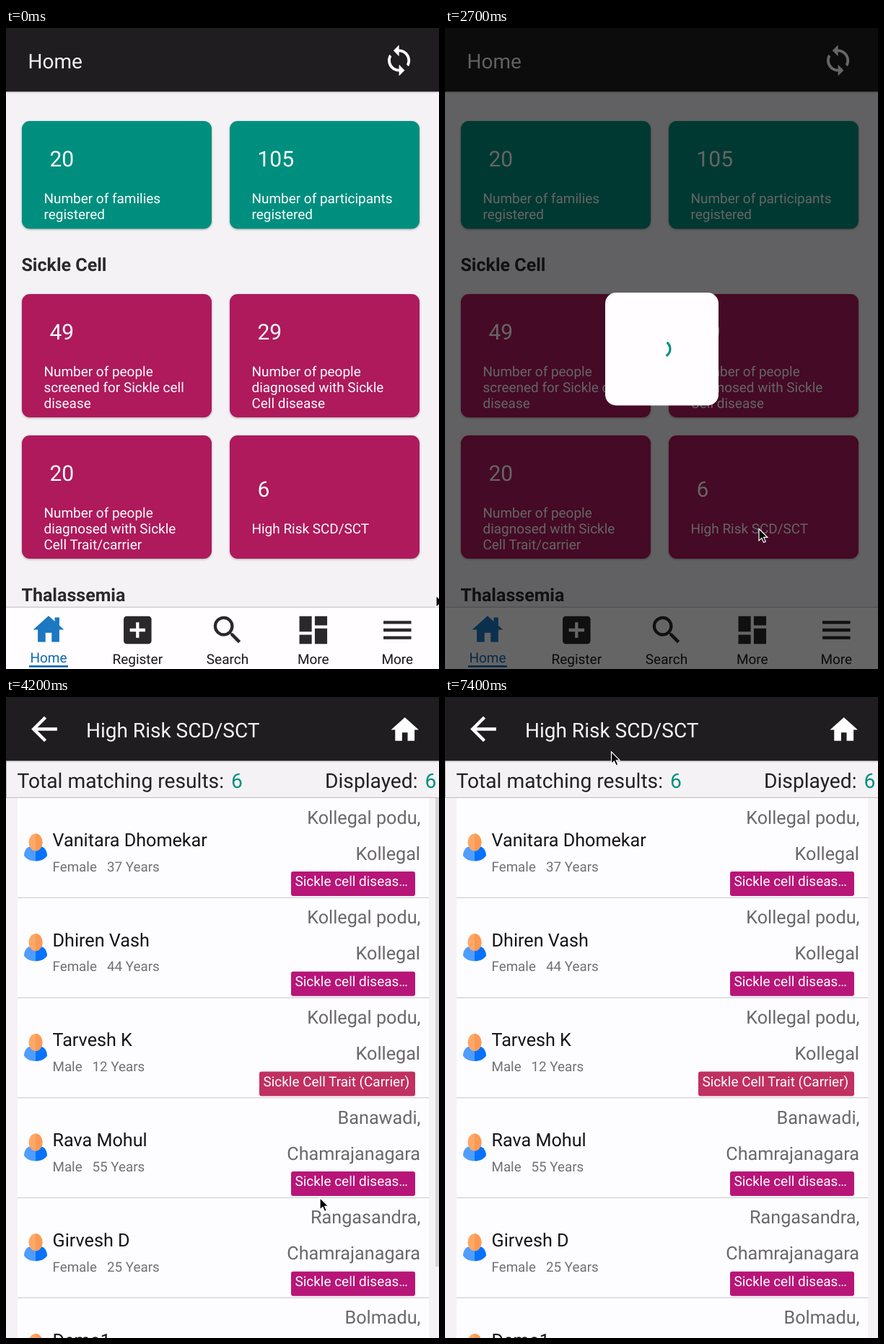
Recreate the animation shown at these times as an HTML page. Size 600 by 889 pixels, loop 7.5 s.

```html
<!DOCTYPE html>
<html lang="en">
<head>
<meta charset="utf-8">
<title>High risk list</title>
<style>
html, body { margin: 0; width: 100%; height: 100%; overflow: hidden; background: #f4f2f5; }
svg { display: block; width: 100%; height: 100%; }
text { font-family: Roboto, sans-serif; text-rendering: geometricPrecision; }
.card { filter: drop-shadow(0 1.5px 1.5px rgba(0, 0, 0, .3)); }
</style>
</head>
<body>
<svg viewBox="0 0 600 889">
  <g id="home"></g>
  <rect id="shade" width="600" height="889" opacity="0"/>
  <g id="results"></g>
  <g id="modal">
    <rect width="600" height="889" opacity=".6"/>
    <rect x="222" y="367" width="157" height="156.500" rx="15" fill="#fffdff"/>
    <circle id="spin" cx="300.500" cy="445" r="11.500" fill="none" stroke="#008f7e" stroke-width="3" pathLength="1"/>
  </g>
  <path id="cursor" d="M0 0V16.500L3.900 12.900L6.600 19L9.300 17.800L6.700 11.900H11.800Z" stroke="#fff" stroke-width="1.200"/>
</svg>
<script>
const LOOP = 7500, STEP = 100;
const DARK = '#1f1d20', INK = '#2a282b', PAGE = '#f4f2f5', TEAL = '#008f7e', PINK = '#ae1a5c', WHITE = '#fdfcfe';
const el = id => document.getElementById(id);
const rect = (x, y, w, h, fill, extra = '') =>
  `<rect x="${x}" y="${y}" width="${w}" height="${h}" fill="${fill}" ${extra}/>`;
const text = (x, y, size, fill, str, extra = '') =>
  `<text x="${x}" y="${y}" font-size="${size}" fill="${fill}" ${extra}>${str}</text>`;
const icon = (name, cx, cy, s, fill) =>
  `<path transform="translate(${cx} ${cy}) scale(${s}) translate(-12 -12)" fill="${fill}" d="${ICONS[name]}"/>`;

const ICONS = {
  sync: 'M12 4V1L8 5l4 4V6c3.310 0 6 2.690 6 6 0 1.010-.25 1.970-.7 2.800l1.460 1.460C19.540 15.030 20 13.570 20 12c0-4.420-3.580-8-8-8zm0 14c-3.310 0-6-2.690-6-6 0-1.010.25-1.970.7-2.800L5.240 7.740C4.460 8.970 4 10.430 4 12c0 4.420 3.580 8 8 8v3l4-4-4-4v3z',
  home: 'M10 20v-6h4v6h5v-8h3L12 3 2 12h3v8z',
  house: 'M19 9.300V4h-3v2.600L12 3 2 12h3v8h5v-6h4v6h5v-8h3z',
  add: 'M19 3H5c-1.110 0-2 .9-2 2v14c0 1.100.89 2 2 2h14c1.100 0 2-.9 2-2V5c0-1.100-.9-2-2-2zm-2 10h-4v4h-2v-4H7v-2h4V7h2v4h4v2z',
  search: 'M15.500 14h-.79l-.28-.27A6.500 6.500 0 1 0 13.730 14.430l.27.28v.79l5 4.990L20.490 19zm-6 0A4.500 4.500 0 1 1 9.500 5a4.500 4.500 0 0 1 0 9z',
  dash: 'M3 13h8V3H3zm0 8h8v-6H3zm10 0h8V11h-8zm0-18v6h8V3z',
  menu: 'M3 18h18v-2H3zm0-5h18v-2H3zm0-7v2h18V6z',
  back: 'M20 11H7.830l5.590-5.590L12 4l-8 8 8 8 1.410-1.410L7.830 13H20z'
};

const header = (title, x) =>
  rect(0, 88, 600, 1, '#000', 'opacity=".35"') + rect(0, 89, 600, 1.500, '#000', 'opacity=".08"') +
  rect(0, 0, 600, 88, DARK) + text(x, 56, 28, '#f5f3f6', title);

function card(x, y, h, fill, count, lines) {
  const base = y + h - 13.300 - (lines.length - 1) * 21.800;
  return rect(x, y, 263, h, fill, 'rx="11" class="card"') +
    text(x + 38.500, base - 51.300, 30, WHITE, count) +
    lines.map((s, i) => text(x + 30.500, base + i * 21.800, 18.950, WHITE, s)).join('');
}

function drawHome() {
  const a = 22, b = 310, bold = 'font-weight="700"';
  const nav = [['add', 182.300, 'Register'], ['search', 307, 'Search'], ['dash', 425.800, 'More'], ['menu', 542.300, 'More']];
  const risk = card(b, 565, 171, PINK, '6', ['High Risk SCD/SCT', '']);
  return rect(0, 0, 600, 889, PAGE) + header('Home', 30.500) + icon('sync', 544.600, 45, 1.950, '#fff') +
    card(a, 129, 149.500, TEAL, '20', ['Number of families', 'registered']) +
    card(b, 129, 149.500, TEAL, '105', ['Number of participants', 'registered']) +
    text(21.500, 336.500, 25, INK, 'Sickle Cell', bold) +
    card(a, 369, 171, PINK, '49', ['Number of people', 'screened for Sickle cell', 'disease']) +
    card(b, 369, 171, PINK, '29', ['Number of people', 'diagnosed with Sickle', 'Cell disease']) +
    card(a, 565, 171, PINK, '20', ['Number of people', 'diagnosed with Sickle', 'Cell Trait/carrier']) +
    risk + rect(b, 565, 263, 171.500, '#000', 'id="press" opacity="0"') +
    text(21.500, 794.500, 25, INK, 'Thalassemia', bold) +
    rect(0, 802.500, 600, 87, '#fffdff') + rect(0, 802.500, 600, 1.500, '#cfcdd0') +
    icon('house', 59, 834.500, 2.130, '#1c78c2') +
    text(59, 880, 19, '#0f66b2', 'Home', 'text-anchor="middle"') + rect(32, 884, 54, 2.700, '#0f66b2') +
    nav.map(([n, x, s]) => icon(n, x, 835, 2.140, INK) +
      text(x, 882, 19, '#19171a', s, 'text-anchor="middle"')).join('');
}

const avatar = y => `<g transform="translate(41 ${y})">
  <path d="M0 5.500H-8C-13 6.500-16 12-16 18C-13 23-7 25.500 0 25.500Z" fill="#4f9dfd"/>
  <path d="M0 5.500H8C13 6.500 16 12 16 18C13 23 7 25.500 0 25.500Z" fill="#0672fd"/>
  <ellipse cy="-.5" rx="9.500" ry="12" fill="#fda867"/>
  <path d="M0-12.500A9.500 12 0 0 1 0 11.500Z" fill="#fb9a55"/></g>`;

function row([name, sex, age, place, town, trait], i) {
  const y = 140 + i * 138.700, end = 'text-anchor="end"';
  const left = trait ? 351 : 395;
  return rect(16, y + 137.700, 570, 1.300, '#d3d1d4') + avatar(y + 62) +
    text(64.500, y + 67, 25.200, '#151316', name) +
    text(64.500, y + 101.700, 18.800, '#717074', sex) +
    text(sex === 'Male' ? 119.500 : 140, y + 101.700, 18.800, '#717074', age + ' Years') +
    text(574.500, y + 35.500, 25.200, '#69676b', place + ',', end) +
    text(574, y + 85.500, 25.200, '#69676b', town, end) +
    rect(left, y + 102, 172, 34, trait ? '#c03060' : '#b81578', `rx="3" style="width:${567 - left}px"`) +
    text(left + 5.500, y + 122.300, 18.950, '#fff', trait ? 'Sickle Cell Trait (Carrier)' : 'Sickle cell diseas…');
}

function drawResults() {
  const people = [
    ['Vanitara Dhomekar', 'Female', 37, 'Kollegal podu', 'Kollegal'],
    ['Dhiren Vash', 'Female', 44, 'Kollegal podu', 'Kollegal'],
    ['Tarvesh K', 'Male', 12, 'Kollegal podu', 'Kollegal', true],
    ['Rava Mohul', 'Male', 55, 'Banawadi', 'Chamrajanagara'],
    ['Girvesh D', 'Female', 25, 'Rangasandra', 'Chamrajanagara'],
    ['Demo1', 'Male', 30, 'Bolmadu', 'Chamrajanagara']
  ];
  return rect(0, 0, 600, 889, PAGE) + rect(16, 140, 570, 749, WHITE) + people.map(row).join('') +
    rect(.5, 88.500, 602, 51, PAGE, 'stroke="#bdbbbe"') +
    text(15.500, 126, 28.200, '#232124', 'Total matching results:') + text(312, 126, 28.200, TEAL, '6') +
    text(442, 126, 28.200, '#232124', 'Displayed:') + text(580.500, 126, 28.200, TEAL, '6') +
    header('High Risk SCD/SCT', 111) + icon('back', 53, 44.500, 2.230, '#fff') + icon('home', 552.700, 45.500, 1.920, '#fff') +
    rect(595, 140, 5, 650, '#000', 'id="bar" opacity="0"');
}

el('home').innerHTML = drawHome();
el('results').innerHTML = drawResults();

const clamp = v => Math.min(1, Math.max(0, v));
const ramp = (t, a, b) => clamp((t - a) / (b - a));
const ease = v => v * v * (3 - 2 * v);

// time, x, y of the pointer tip
const PATH = [
  [100, 596, 787], [200, 556, 770], [300, 556, 770], [800, 435, 694.500], [4500, 435, 694.500],
  [5100, 210, 180], [5500, 138, 65], [6000, 138, 65], [6600, 230.500, 76]
];
function pointer(t) {
  const i = PATH.findIndex(k => k[0] > t);
  if (i === 0) return PATH[0].slice(1);
  if (i < 0) return PATH[PATH.length - 1].slice(1);
  const [t0, x0, y0] = PATH[i - 1], [t1, x1, y1] = PATH[i], p = ramp(t, t0, t1);
  return [x0 + (x1 - x0) * p, y0 + (y1 - y0) * p];
}

// critically damped spring, snapping to rest near its end
function slide(t) {
  const w = Math.max(0, t - 2991) * .01826;
  const rest = (1 + w) * Math.exp(-w);
  return rest < .003 ? 1 : 1 - rest;
}

function spinner(t) {
  const time = Math.max(0, t - 1660), f = time / 1333, turn = Math.floor(f), p = f - turn;
  const start = ease(clamp(2 * p - 1)) * .75, end = ease(clamp(2 * p)) * .75;
  const angle = -90 + 360 * (start + .25 * p) + time / 4444 * 720;
  el('spin').setAttribute('stroke-dasharray', `${Math.max(.04, end - start)} 2`);
  el('spin').setAttribute('transform', `rotate(${angle} 300.5 445)`);
}

function render(ms) {
  const t = Math.floor(ms % LOOP / STEP) * STEP;
  const p = slide(t), show = ramp(t, 1500, 1700) * (1 - ramp(t, 2700, 2900));
  el('home').setAttribute('transform', `translate(${-180 * p} 0)`);
  el('results').setAttribute('transform', `translate(${600 * (1 - p)} 0)`);
  el('results').style.display = p > 0 ? '' : 'none';
  el('shade').setAttribute('opacity', .07 * p);
  el('modal').setAttribute('opacity', show);
  el('press').setAttribute('opacity', .2 * ramp(t, 900, 1100) * (1 - ramp(t, 1300, 1600)));
  el('bar').setAttribute('opacity', .16 * (1 - ramp(t, 4100, 4300) * (t < 4300 ? .4 : 1)));
  spinner(t);
  el('cursor').setAttribute('transform', `translate(${pointer(t).join(' ')})`);
}

const origin = performance.now();
function tick() {
  render(performance.now() - origin);
  requestAnimationFrame(tick);
}
render(0);
requestAnimationFrame(tick);
</script>
</body>
</html>
```
